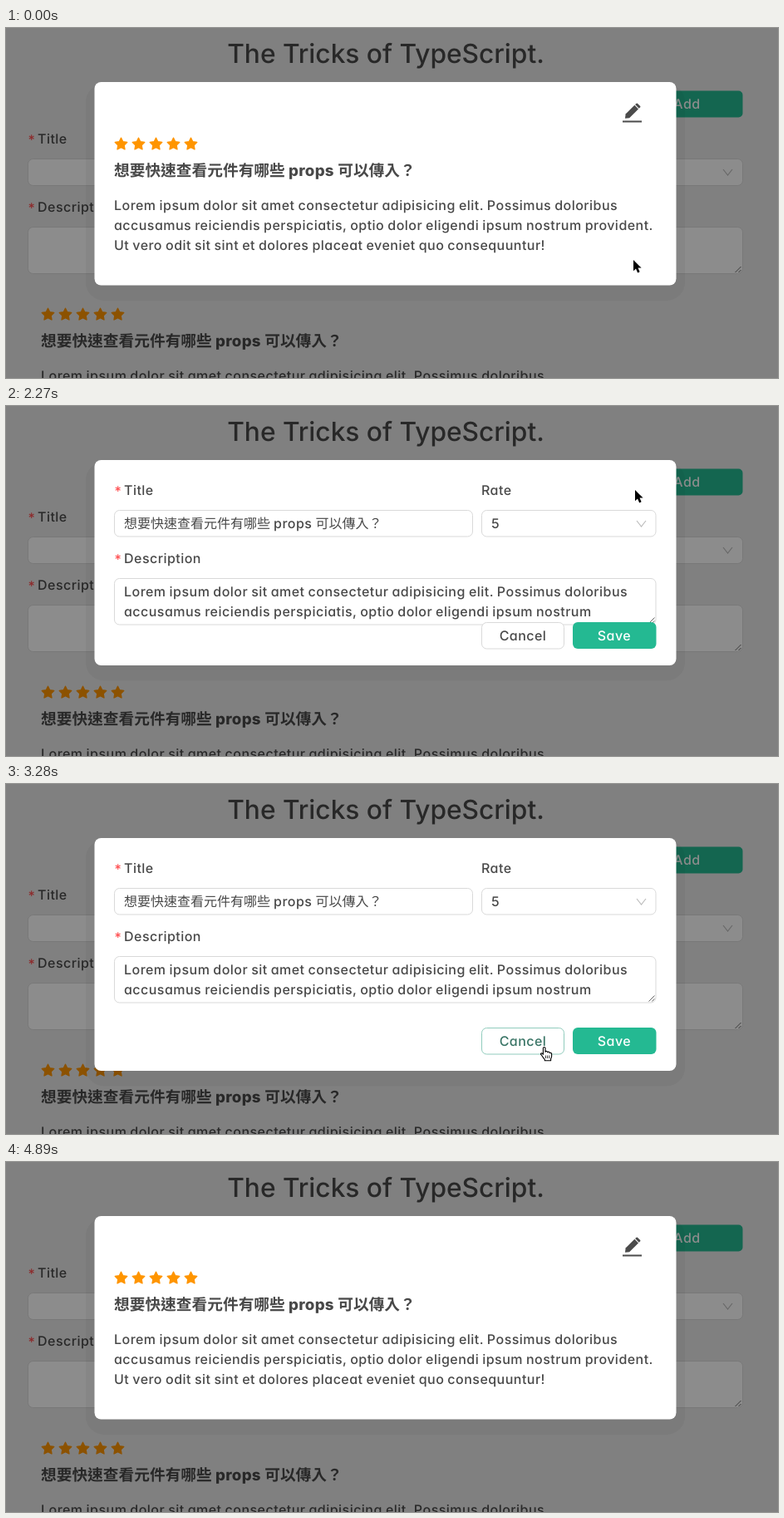
An HTML page for the animation above (5910 ms loop, 929 px wide and 421 px high).

```html
<!DOCTYPE html>
<html lang="zh-TW">
<head>
<meta charset="utf-8">
<title>Edit dialog</title>
<style>
  html, body { margin: 0; width: 100%; height: 100%; overflow: hidden; background: #808080; }
  svg { display: block; width: 929px; height: 421px; }
  text {
    font: 450 16px Inter, "Noto Sans CJK TC", "Noto Sans CJK", sans-serif;
    font-feature-settings: "cv11";
    font-optical-sizing: none;
    text-rendering: geometricPrecision;
    fill: #484848;
    white-space: pre;
  }
  .latin { letter-spacing: .47px; word-spacing: -.7px; }
  .mid { text-anchor: middle; }
  .headline { font-size: 31.7px; }
  .heading { font-size: 18.72px; font-weight: 700; }
  .heading tspan { font-weight: 800; letter-spacing: .25px; }
  .star { fill: #ff4d4f; }
  .on-green { fill: #fff; }
  .green { fill: #24b992; }
  .rating { fill: #ff9500; stroke: #ff9500; stroke-width: 1.4; stroke-linejoin: round; }
  .field { fill: #fff; stroke: #d9d9d9; }
  .line { fill: none; stroke: #bdbdbd; stroke-width: 1.2; }
  .grip { fill: none; stroke: #666; }
</style>
</head>
<body>
<svg viewBox="0 0 929 421">
  <defs>
    <path id="chevron" class="line" d="M-5.5-3.5 0 3.5 5.5-3.5"/>
    <path id="grip" class="grip" d="M0 0 7-7M4 0 7-3"/>
    <g id="review">
      <path id="rating" class="rating" transform="translate(8.5 139.8)"/>
      <text class="heading" y="178">想要快速查看元件有哪些<tspan> props </tspan>可以傳入？</text>
      <text class="latin" y="219">Lorem ipsum dolor sit amet consectetur adipisicing elit. Possimus doloribus</text>
      <text class="latin" y="243">accusamus reiciendis perspiciatis, optio dolor eligendi ipsum nostrum provident.</text>
      <text class="latin" y="267">Ut vero odit sit sint et dolores placeat eveniet quo consequuntur!</text>
    </g>
  </defs>

  <g id="page">
    <rect width="929" height="421" fill="#e9e9e9"/>
    <text class="headline mid" x="457" y="42">The Tricks of TypeScript.</text>
    <rect class="green" x="753" y="75.5" width="133.5" height="32" rx="5"/>
    <text class="latin mid on-green" x="819.5" y="97">Add</text>
    <text class="star" x="26.5" y="140">*</text>
    <text class="latin" x="38" y="139">Title</text>
    <rect class="field" x="26.5" y="157.5" width="860" height="32" rx="6"/>
    <use href="#chevron" x="868.5" y="173.5"/>
    <text class="star" x="26.5" y="222">*</text>
    <text class="latin" x="38" y="221">Description</text>
    <rect class="field" x="26.5" y="239.5" width="860" height="56" rx="6"/>
    <use href="#grip" x="877.5" y="294"/>
    <use href="#review" x="42" y="205"/>
  </g>
  <rect id="mask" width="929" height="421" fill-opacity=".45"/>

  <rect id="shadow" x="96" y="67" width="721" rx="22" fill-opacity=".045"/>
  <rect id="modal" x="106.5" y="65" width="700" rx="8" fill="#fff"/>

  <g id="view">
    <rect id="penHover" x="724" y="85" width="58" height="32" rx="6" fill="#f0f0f0"/>
    <g fill="#4b4b4b">
      <path d="M745 108.8 745.6 103.6 756.4 92.8 761 97.4 750.2 108.2Z"/>
      <path d="M757.1 92.1 758.3 90.9Q759.2 90 760.1 90.9L763 93.8Q763.9 94.7 763 95.6L761.7 96.7Z"/>
      <rect x="742" y="111.5" width="23" height="2"/>
    </g>
    <use href="#review" x="130"/>
  </g>

  <g id="form">
    <text class="star" x="130.5" y="108">*</text>
    <text class="latin" x="142" y="107">Title</text>
    <text class="latin" x="572" y="107">Rate</text>
    <rect id="title" class="field" x="130.5" y="125.5" width="431" height="31.5" rx="6"/>
    <text x="142" y="147">想要快速查看元件有哪些<tspan class="latin"> props </tspan>可以傳入？</text>
    <rect id="rate" class="field" x="572.5" y="125.5" width="209.5" height="31.5" rx="6"/>
    <text x="584" y="147">5</text>
    <use href="#chevron" x="764.5" y="141.5"/>
    <text class="star" x="130.5" y="190">*</text>
    <text class="latin" x="142" y="189">Description</text>
    <rect id="description" class="field" x="130.5" y="207.5" width="651.5" height="55.5" rx="6"/>
    <text class="latin" x="142" y="229">Lorem ipsum dolor sit amet consectetur adipisicing elit. Possimus doloribus</text>
    <text class="latin" x="142" y="253">accusamus reiciendis perspiciatis, optio dolor eligendi ipsum nostrum</text>
    <use href="#grip" x="773.5" y="261.5"/>
    <g id="buttons">
      <rect id="cancel" class="field" x="572.5" y="293.5" width="99" height="31.5" rx="6"/>
      <text id="cancelText" class="latin mid" x="622" y="315">Cancel</text>
      <rect class="green" x="682" y="293" width="100.5" height="32" rx="6"/>
      <text class="latin mid on-green" x="732" y="315">Save</text>
    </g>
  </g>

  <g id="cursor">
    <path id="arrow" d="M0 0V13.2L3 10.5 5.2 15.4 7.6 14.3 5.5 9.5H9.6Z" stroke="#fff" stroke-width="1.6" paint-order="stroke"/>
    <g id="hand" fill="#fff" stroke="#000" stroke-width="1.1" stroke-linejoin="round">
      <path d="M-.6 9.3V1.8Q-.6.5.7.5T2 1.8V6.2Q2.5 5.2 3.6 5.5T4.7 6.7Q5.4 5.8 6.4 6.2T7.3 7.6Q8.1 7 8.9 7.5T9.6 9V11.5Q9.5 13 8.6 14.6V16.8H1.3V15.3Q-.6 13.4-1.6 11.6T-3.5 9.1Q-3.6 7.8-2.5 7.9T-.6 9.3Z"/>
      <path d="M2.4 10.5V14M4.6 10.5V14M6.8 10.5V14" stroke-width=".8"/>
    </g>
  </g>
</svg>
<script>
const LOOP = 5910;
const OPEN = 2270, CLOSE = 4100;
const GREEN = [36, 185, 146], BORDER = [217, 217, 217], INK = [72, 72, 72];
const $ = id => document.getElementById(id);

// Each move is sampled in equal steps along evenly timed points.
const moves = [
  { from: 510, to: 1090, steps: 11, points: [[755, 279], [758, 246], [760, 181], [756, 138], [750, 119]] },
  { from: 1150, to: 1270, steps: 3, points: [[750, 119], [746, 103], [744, 92], [744, 109]] },
  { from: 1440, to: 1560, steps: 3, points: [[744, 109], [757, 101]] },
  { from: 2810, to: 3400, steps: 11, points: [[757, 101], [704, 186], [665, 262], [648, 312], [645, 328]] },
  { from: 3450, to: 3630, steps: 4, points: [[645, 328], [650, 321]] },
  { from: 4720, to: 4840, steps: 3, points: [[650, 321], [690, 350], [725, 375], [760, 400]] }
];

function along(points, u) {
  const p = u * (points.length - 1);
  const i = Math.min(Math.floor(p), points.length - 2);
  return points[i].map((v, k) => v + (points[i + 1][k] - v) * (p - i));
}

function cursorAt(t) {
  const move = moves.filter(m => m.from <= t).pop();
  if (!move) return moves[0].points[0];
  const step = (move.to - move.from) / (move.steps - 1);
  const done = Math.floor((t - move.from) / step + 0.15) + 1;
  return along(move.points, Math.min(1, done / move.steps));
}

function isOver(id, t) {
  if (t < OPEN || t >= CLOSE) return false;
  const [x, y] = cursorAt(t);
  const box = $(id), num = name => +box.getAttribute(name);
  return x >= num('x') && x <= num('x') + num('width') &&
         y >= num('y') && y <= num('y') + num('height');
}

// Averaging the last 200 ms gives the fade of the hover colour.
function hover(id, t) {
  let sum = 0;
  for (let lag = 0; lag < 200; lag += 20) sum += isOver(id, t - lag);
  return sum / 10;
}

const mix = (a, b, u) => `rgb(${a.map((v, i) => Math.round(v + (b[i] - v) * u))})`;
const show = (id, on) => { $(id).style.display = on ? '' : 'none'; };

function starPath(cx) {
  const corners = Array.from({ length: 10 }, (_, i) => {
    const r = i % 2 ? 3.8 : 7.6, a = i * Math.PI / 5 - Math.PI / 2;
    return `${(cx + r * Math.cos(a)).toFixed(2)} ${(r * Math.sin(a)).toFixed(2)}`;
  });
  return `M${corners.join('L')}Z`;
}

function modalBottom(t) {
  if (t < OPEN || t >= CLOSE) return 309.5;
  return t < 2330 ? 312 : t < 2390 ? 320 : 345;
}

function draw(t) {
  const editing = t >= OPEN && t < CLOSE;
  const bottom = modalBottom(t);
  show('view', !editing);
  show('form', editing);
  show('penHover', t >= 1150 && t < OPEN);
  $('modal').setAttribute('height', bottom - 65);
  $('shadow').setAttribute('height', bottom + 18.5 - 67);
  $('buttons').setAttribute('transform', `translate(0 ${bottom - 345})`);

  for (const id of ['title', 'rate', 'description', 'cancel'])
    $(id).style.stroke = mix(BORDER, GREEN, hover(id, t));
  $('cancelText').style.fill = mix(INK, GREEN, hover('cancel', t));

  const pointing = (t >= 1150 && t < 1980) || (t < 4040 && isOver('cancel', t));
  const [x, y] = cursorAt(t);
  show('cursor', t < 4890);
  show('hand', pointing);
  show('arrow', !pointing);
  $('cursor').setAttribute('transform', `translate(${Math.round(x)} ${Math.round(y)})`);
}

$('rating').setAttribute('d', [0, 1, 2, 3, 4].map(i => starPath(i * 21)).join(''));
const start = performance.now();
function tick() {
  draw((performance.now() - start) % LOOP);
  requestAnimationFrame(tick);
}
tick();
</script>
</body>
</html>
```
